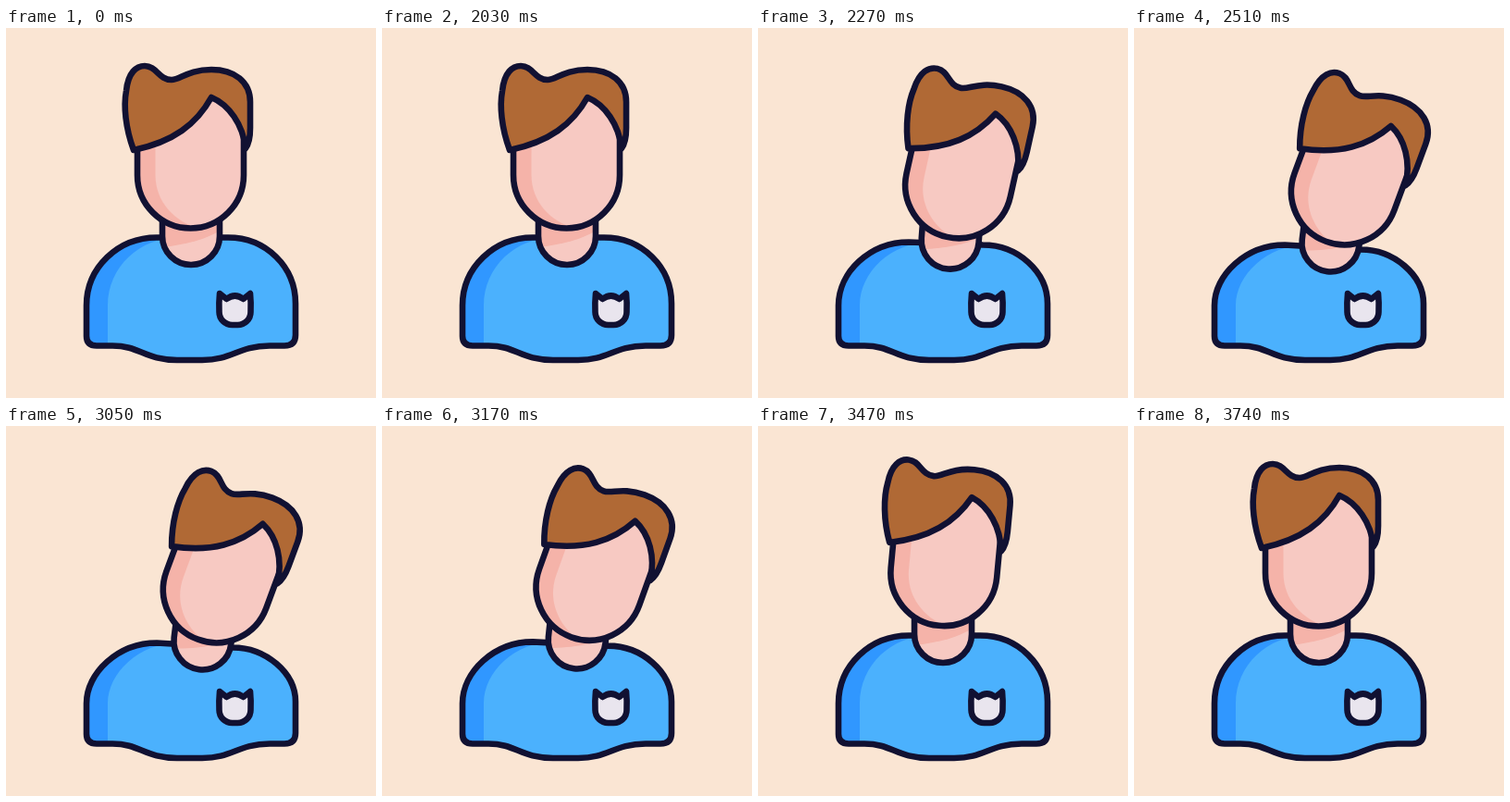
Write an HTML page that moves like this. It is 400 by 400 pixels and loops after 3.77 s.

```html
<!DOCTYPE html>
<html lang="en">
<head>
<meta charset="utf-8">
<title>Head tilt</title>
<style>
  html, body { margin: 0; width: 100%; height: 100%; overflow: hidden; background: #fae5d3; }
  svg { display: block; width: 100%; height: 100%; }
  .line { fill: none; stroke: #111132; stroke-width: 6.6; stroke-linejoin: round; stroke-linecap: round; }
</style>
</head>
<body>
<svg viewBox="0 0 400 400">
  <defs>
    <path id="torso"/>
    <path id="throat" d="M169 195V225a31 31 0 0 0 62 0V195Z"/>
    <path id="face" d="M142 100V159a57.500 57.500 0 0 0 115 0V66H200Z"/>
    <clipPath id="torsoClip"><use href="#torso"/></clipPath>
    <clipPath id="throatClip"><use href="#throat"/></clipPath>
    <clipPath id="faceClip"><use href="#face"/></clipPath>
  </defs>

  <use href="#torso" fill="#3097ff"/>
  <g clip-path="url(#torsoClip)"><path id="light" fill="#4bb1fd"/></g>
  <use href="#torso" class="line"/>
  <path class="line" style="fill:#e9e5ee" d="M231 287L238.500 293Q247.500 286 256.500 293L264 287Q265 297 264.500 307A14 14 0 0 1 250.500 321H244.500A14 14 0 0 1 230.500 307Q230 297 231 287Z"/>

  <g id="neck">
    <use href="#throat" fill="#f7c9c2"/>
    <path clip-path="url(#throatClip)" fill="#f5b3a9" d="M160 190H240V213C222 227 200 234 160 238Z"/>
    <use href="#throat" class="line"/>
  </g>

  <g id="head">
    <use href="#face" fill="#f5b3a9"/>
    <path clip-path="url(#faceClip)" fill="#f7c9c2" d="M161.500 60V159C161.500 189 184 212 214 218H270V60Z"/>
    <use href="#face" class="line"/>
    <path class="line" style="fill:#b06935" d="M138 132C129 108 127 84 130 68C132 48 141 41 150 41C163 41 165 56 179 56C188 56 197 45 222 45C247 45 264 58 264 80V108C264 120 262 126 259 130C256 104 241 83 222 75C206 104 181 123 138 132Z"/>
  </g>
</svg>
<script>
const LOOP = 3770;
const $ = id => document.getElementById(id);

// Cubic ease in and out between two times
function ease(t, from, to) {
  const x = Math.min(1, Math.max(0, (t - from) / (to - from)));
  return x < 0.5 ? 4 * x ** 3 : 1 - 4 * (1 - x) ** 3;
}

// Left shoulder at x, closed along the right shoulder and the hem
function torso(x, lean) {
  const left = 226.5 + 8 * lean, right = 226.5 + 13 * lean;
  return `M${x} 300C${x} ${259 + 8 * lean} ${x + 34} ${left} ${x + 76} ${left}` +
    `L${240 + 5 * lean} ${right}C281 ${right} 313 ${258 + 9 * lean} 313 298` +
    `V332Q313 343.5 301 343.5H285C250 344 245 359 212 359H185` +
    `C150 359 145 343.5 115 343.5H${x + 11}Q${x} 343.5 ${x} 333Z`;
}

function draw(t) {
  const out = ease(t, 2000, 2500);
  const lean = out - ease(t, 3000, 3520);
  const tilt = out - ease(t, 3030, LOOP);   // the head follows late on the way back
  $('torso').setAttribute('d', torso(87, lean));
  $('light').setAttribute('d', torso(110, lean) + 'M110 298H320V370H110Z');
  $('neck').setAttribute('transform',
    `translate(${12.5 * lean} ${7.5 * lean}) rotate(${7 * lean} 200 225)`);
  $('head').setAttribute('transform',
    `translate(${22.8 * lean} ${18.9 * lean}) rotate(${20.3 * tilt} 205 173)`);
}

const start = performance.now();
function tick() {
  draw((performance.now() - start) % LOOP);
  requestAnimationFrame(tick);
}
tick();
</script>
</body>
</html>
```
